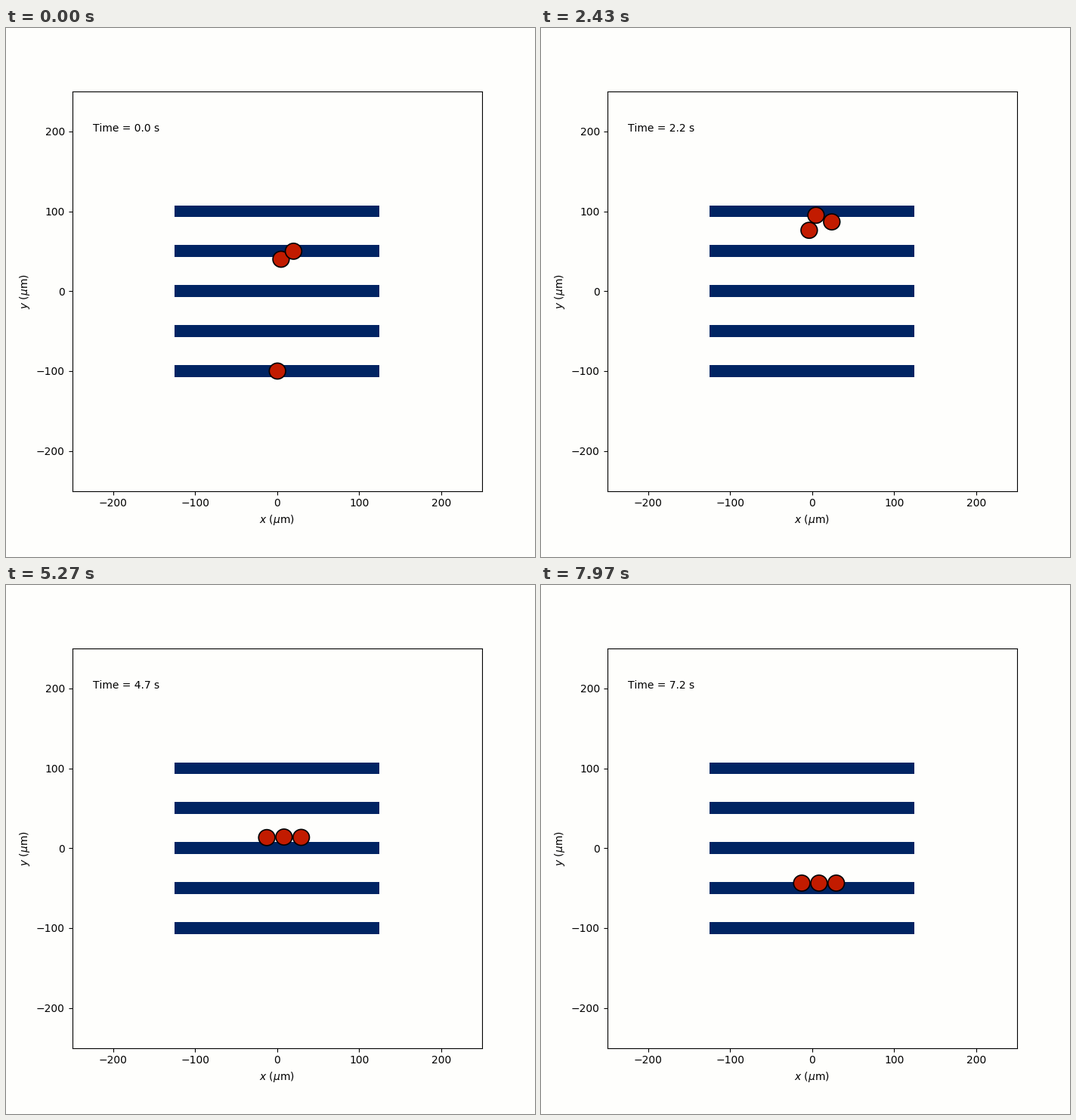
Recreate the animation shown at these times as a matplotlib script. Size 700 px wide and 700 px high, loop 8 s.

```python
import numpy as np
import matplotlib.pyplot as plt
from matplotlib.animation import FuncAnimation
from matplotlib.patches import Circle, Rectangle

FRAMES, LOOP_MS = 240, 8000
DT, SUB = 0.03, 20            # simulated seconds per frame, substeps
PULL, PUSH = 1.84, 40.0       # rates of trap attraction and contact repulsion
GAP = 21.0                    # rest distance of touching particles
HOLD = 67                     # frames each bar stays active
BARS = [100, 50, 0, -50, -100]
START = [[0.4, -100], [4.8, 40], [20, 50]]
PAIRS = [(0, 1), (0, 2), (1, 2)]
PAPER, NAVY, RED = "#fefefc", "#002463", "#c21b00"

plt.rcParams["text.kerning_factor"] = 6   # whole-pixel kerning


def velocity(pos, target):
    vel = np.zeros_like(pos)
    vel[:, 1] = PULL * (target - pos[:, 1])
    for i, j in PAIRS:
        sep = pos[j] - pos[i]
        dist = np.hypot(*sep)
        if dist < GAP:
            kick = PUSH * (GAP - dist) * sep / dist
            vel[i] -= kick
            vel[j] += kick
    return vel


def simulate():
    pos = np.array(START, float)
    path = [pos.copy()]
    for n in range(FRAMES - 1):
        target = BARS[min(n // HOLD, len(BARS) - 1)]
        for _ in range(SUB):
            pos += velocity(pos, target) * DT / SUB
        path.append(pos.copy())
    return path


path = simulate()

fig = plt.figure(figsize=(7, 7), dpi=100, facecolor=PAPER)
ax = fig.add_axes([0.125, 0.125, 0.775, 0.755], facecolor=PAPER)
ax.set(xlim=(-250, 250), ylim=(-250, 250))
ax.set_xticks(range(-200, 201, 100))
ax.set_yticks(range(-200, 201, 100))
ax.set_xlabel(r"$x$ ($\mu$m)")
ax.set_ylabel(r"$y$ ($\mu$m)")

for y in BARS:
    ax.add_patch(Rectangle((-125, y - 7.5), 250, 15, fc=NAVY, ec="none"))

balls = [ax.add_patch(Circle(p, 10, fc=RED, ec="black", lw=1.2, zorder=3 + i))
         for i, p in enumerate(START)]
clock = ax.text(-225, 200, "")


def draw(n):
    for ball, p in zip(balls, path[n]):
        ball.center = p
    clock.set_text(f"Time = {n * DT:.1f} s")
    return [*balls, clock]


anim = FuncAnimation(fig, draw, frames=FRAMES, interval=LOOP_MS / FRAMES,
                     repeat=True, repeat_delay=0, blit=False)
plt.show()
```
